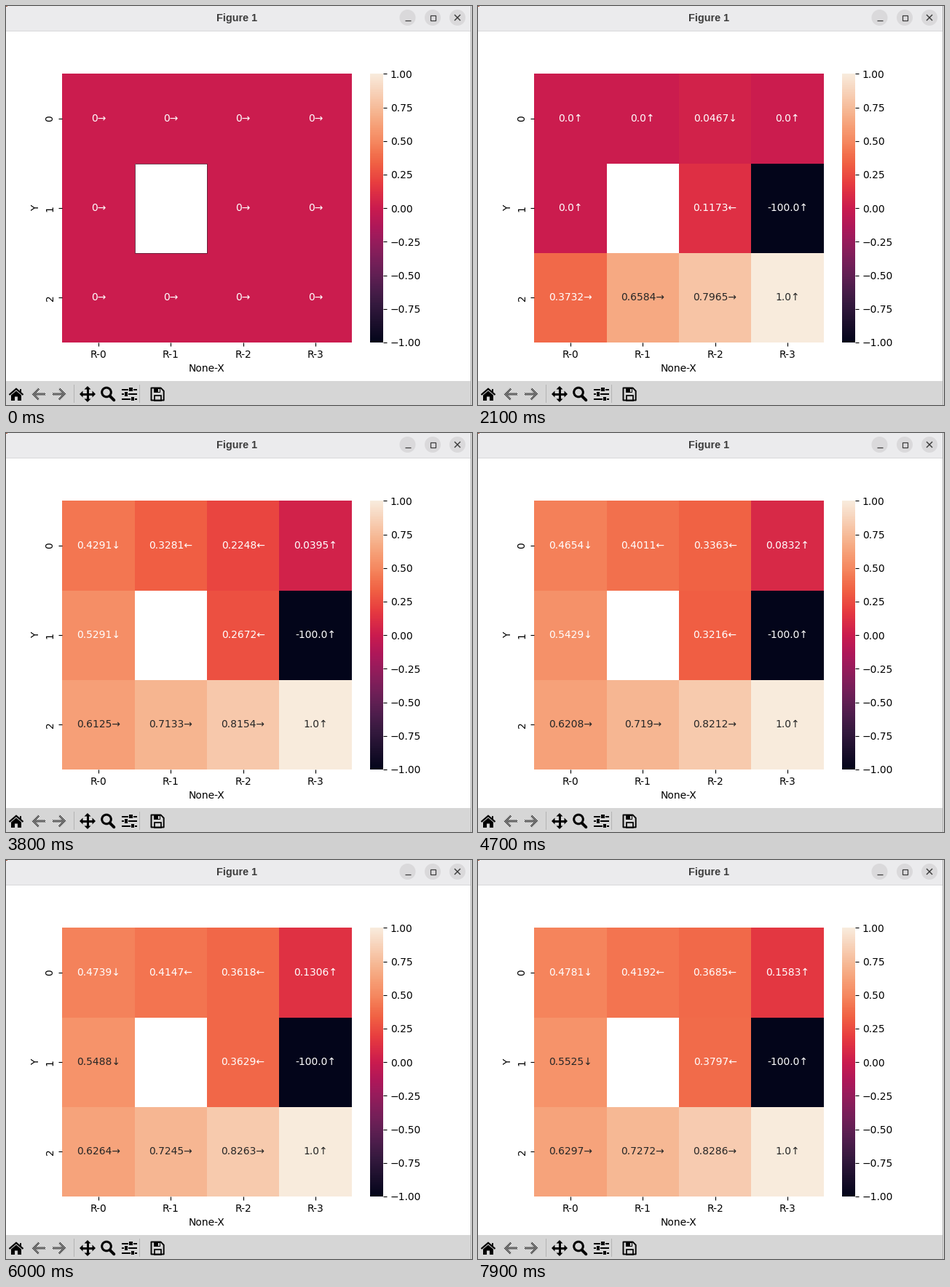
A matplotlib script for the animation above (8 s loop, 640x549 px).

```python
import math

import matplotlib.pyplot as plt
import numpy as np
from matplotlib.animation import FuncAnimation
from matplotlib.colors import LinearSegmentedColormap
from matplotlib.patches import Circle, Polygon, Rectangle

W, H, DPI = 640, 549, 100
PX = 72 / DPI
plt.rcParams.update({"font.family": "DejaVu Sans", "font.size": 10})

# ---- Grid world solved by value iteration ----
ROWS, COLS = 3, 4
WALL = (1, 1)
TERMINALS = {(2, 3): 1.0, (1, 3): -100.0}
ACTIONS = {"↑": (-1, 0), "↓": (1, 0), "←": (0, -1), "→": (0, 1)}
GAMMA = 0.9
CELLS = [(r, c) for r in range(ROWS) for c in range(COLS) if (r, c) != WALL]


def step(cell, move):
    r, c = cell[0] + move[0], cell[1] + move[1]
    inside = 0 <= r < ROWS and 0 <= c < COLS
    return (r, c) if inside and (r, c) != WALL else cell


def expected(values, cell, move):
    dr, dc = move
    return GAMMA * (0.8 * values[step(cell, move)]
                    + 0.1 * values[step(cell, (dc, dr))]
                    + 0.1 * values[step(cell, (-dc, -dr))])


def sweep(values):
    new, policy = {}, {}
    for cell in CELLS:
        if cell in TERMINALS:
            new[cell], policy[cell] = TERMINALS[cell], "↑"
            continue
        scores = {a: expected(values, cell, m) for a, m in ACTIONS.items()}
        policy[cell] = max(scores, key=scores.get)
        new[cell] = scores[policy[cell]]
    return new, policy


history = [(dict.fromkeys(CELLS, 0), dict.fromkeys(CELLS, "→"))]
for _ in range(22):
    history.append(sweep(history[-1][0]))

# ---- Colours ----
STOPS = [(0, "#03051a"), (1 / 7, "#35193e"), (0.2, "#4c1d4b"),
         (0.25, "#611f53"), (2 / 7, "#701f57"), (1 / 3, "#841e5a"),
         (0.4, "#a11a5b"), (3 / 7, "#ad1759"), (0.5, "#ca1b4e"),
         (4 / 7, "#e13342"), (0.6, "#e83f3f"), (2 / 3, "#f06043"),
         (5 / 7, "#f37651"), (0.75, "#f58860"), (0.8, "#f69c73"),
         (6 / 7, "#f6b48f"), (1, "#f8ebdc")]
heat = LinearSegmentedColormap.from_list("heat", STOPS, N=256)
heat.set_bad("white")

fig = plt.figure(figsize=(W / DPI, H / DPI), dpi=DPI, facecolor="white")

# ---- Window frame, in pixel coordinates ----
win = fig.add_axes([0, 0, 1, 1])
win.set(xlim=(0, W), ylim=(H, 0))
win.axis("off")


def rect(x, y, w, h, color, **kw):
    win.add_patch(Rectangle((x, y), w, h, fc=color, lw=0, **kw))


def poly(points, color="black", **kw):
    patch = Polygon(points, closed=True, fc=color, lw=0, **kw)
    win.add_patch(patch)
    return patch


def line(xs, ys, width=1.0, color="black", cap="butt"):
    win.plot(xs, ys, color=color, lw=width * PX, solid_capstyle=cap,
             solid_joinstyle="miter", scalex=False, scaley=False)


def disc(x, y, r, color, **kw):
    win.add_patch(Circle((x, y), r, fc=color, lw=0, **kw))


def title_bar():
    rect(0, 0, W, 35, "#ebebed")
    rect(0, 34, W, 1, "#d8d8da")
    win.text(317, 17, "Figure 1", family="Liberation Sans", weight="bold",
             size=10.4, color="#3d3d3d", ha="center", va="center")
    for x in (551.5, 586, 620):
        disc(x, 16, 11, "#dad9db")
    ink = "#3a3a3a"
    line([547.5, 555.5], [19.5, 19.5], 1.2, ink)
    win.add_patch(Rectangle((582.5, 12.5), 7, 7, fill=False, ec=ink, lw=1.2 * PX))
    line([616, 624], [12, 20], 1.4, ink)
    line([616, 624], [20, 12], 1.4, ink)
    rect(0, 0, 2, 1, "#b0583f")


def faded_arrow(cx, cy, d):
    """Stippled arrow pointing along d (-1 left, 1 right)."""
    shape = [(9.5, 0), (1, -8.5), (-1, -6.5), (3.5, -1.6), (-9, -1.6),
             (-9, 1.6), (3.5, 1.6), (-1, 6.5), (1, 8.5)]
    clip = poly([(cx + d * x, cy + y) for x, y in shape], "none")
    stipple = np.zeros((20, 20, 4))
    stipple[..., 3] = np.indices((20, 20)).sum(0) % 2
    image = win.imshow(stipple, extent=(cx - 10, cx + 10, cy + 10, cy - 10),
                       interpolation="nearest", aspect="auto", zorder=3)
    image.set_clip_path(clip)
    win.set(xlim=(0, W), ylim=(H, 0))


def tool_bar():
    gray = "#d6d6d6"
    rect(0, 516, W, 33, gray)
    for x in (93, 183):
        rect(x, 521, 1, 25, "#b4b4b4")
    # home
    line([4.5, 14, 23.5], [535, 526.8, 535], 2.2)
    rect(18.5, 526.5, 2.5, 5, "black")
    poly([(7, 535.5), (14, 529.6), (21, 535.5), (21, 543), (16, 543),
          (16, 537.5), (12, 537.5), (12, 543), (7, 543)])
    faded_arrow(45, 534, -1)
    faded_arrow(73, 534, 1)
    # pan
    line([104, 120], [534, 534], 3)
    line([112, 112], [526, 542], 3)
    for dx, dy in ACTIONS.values():
        tip = (112 + 11 * dx, 534 + 11 * dy)
        bx, by = 112 + 6.5 * dx, 534 + 6.5 * dy
        poly([tip, (bx + 4.5 * dy, by + 4.5 * dx), (bx - 4.5 * dy, by - 4.5 * dx)])
    # zoom
    win.add_patch(Circle((138, 531.5), 6.3, fill=False, ec="black", lw=3 * PX))
    line([143, 148.3], [537, 542.3], 4, cap="round")
    # sliders
    for y, knob in ((527.5, 171.5), (534, 165), (540.5, 174)):
        line([159, 180], [y, y], 2)
        rect(knob - 3.3, y - 3, 6.6, 6, gray, zorder=3)
        rect(knob - 2.3, y - 2.8, 4.6, 5.6, "black", zorder=4)
    # save
    win.add_patch(Polygon([(199.5, 525.5), (212.5, 525.5), (216.7, 529.7),
                           (216.7, 542.5), (199.5, 542.5)], fill=False,
                          ec="black", lw=1.9 * PX, joinstyle="round"))
    rect(203, 525.5, 9, 6.5, "black")
    rect(208.5, 526.5, 2, 4, gray)
    win.add_patch(Rectangle((203.5, 536), 9.5, 6.5, fill=False, ec="black",
                            lw=1.7 * PX))


title_bar()
tool_bar()
rect(638, 0, 1, H, "#a9a9a9", zorder=5)
rect(639, 0, 1, H, "#e4e4e4", zorder=5)


# ---- Heat map and colour bar ----
def plot_axes(x, y, w, h):
    return fig.add_axes([x / W, 1 - (y + h) / H, w / W, h / H])


TOP, HEIGHT = 93.3, 369.6
ax = plot_axes(77.3, TOP, 397.3, HEIGHT)
mesh = ax.pcolormesh(np.arange(COLS + 1), np.arange(ROWS + 1),
                     np.zeros((ROWS, COLS)), cmap=heat, vmin=-1, vmax=1)
ax.set(xlim=(0, COLS), ylim=(ROWS, 0), xlabel="None-X", ylabel="Y")
ax.set_xticks(np.arange(COLS) + 0.5, [f"R-{c}" for c in range(COLS)])
ax.set_yticks(np.arange(ROWS) + 0.5, [str(r) for r in range(ROWS)],
              rotation=90, va="center")
ax.spines[:].set_visible(False)
hole_edge = ax.add_patch(Rectangle((WALL[1], WALL[0]), 1, 1, fill=False,
                                   ec="#5a2035", lw=0.6))

bar = fig.colorbar(mesh, cax=plot_axes(499.7, TOP, 18.4, HEIGHT))
bar.outline.set_linewidth(0)

labels = {(r, c): ax.text(c + 0.5, r + 0.5, "", ha="center", va="center")
          for r, c in CELLS}

# ---- Animation ----
FRAMES, INTERVAL = 80, 100
FIRST_SWEEP, SWEEP_TIME = 1.125, 0.3315
DARK_TEXT_ABOVE = 0.5469


def update(frame):
    elapsed = (frame + 1) * INTERVAL / 1000 - FIRST_SWEEP
    k = max(0, math.ceil(elapsed / SWEEP_TIME))
    values, policy = history[k]
    grid = np.full((ROWS, COLS), np.nan)
    for cell, label in labels.items():
        grid[cell] = values[cell]
        label.set_text(f"{round(values[cell], 4)}{policy[cell]}")
        label.set_color("0.15" if values[cell] > DARK_TEXT_ABOVE else "white")
    mesh.set_array(np.ma.masked_invalid(grid))
    hole_edge.set_visible(k == 0)
    return [mesh, hole_edge, *labels.values()]


anim = FuncAnimation(fig, update, frames=FRAMES, interval=INTERVAL,
                     repeat=True, repeat_delay=0, blit=False)
plt.show()
```
